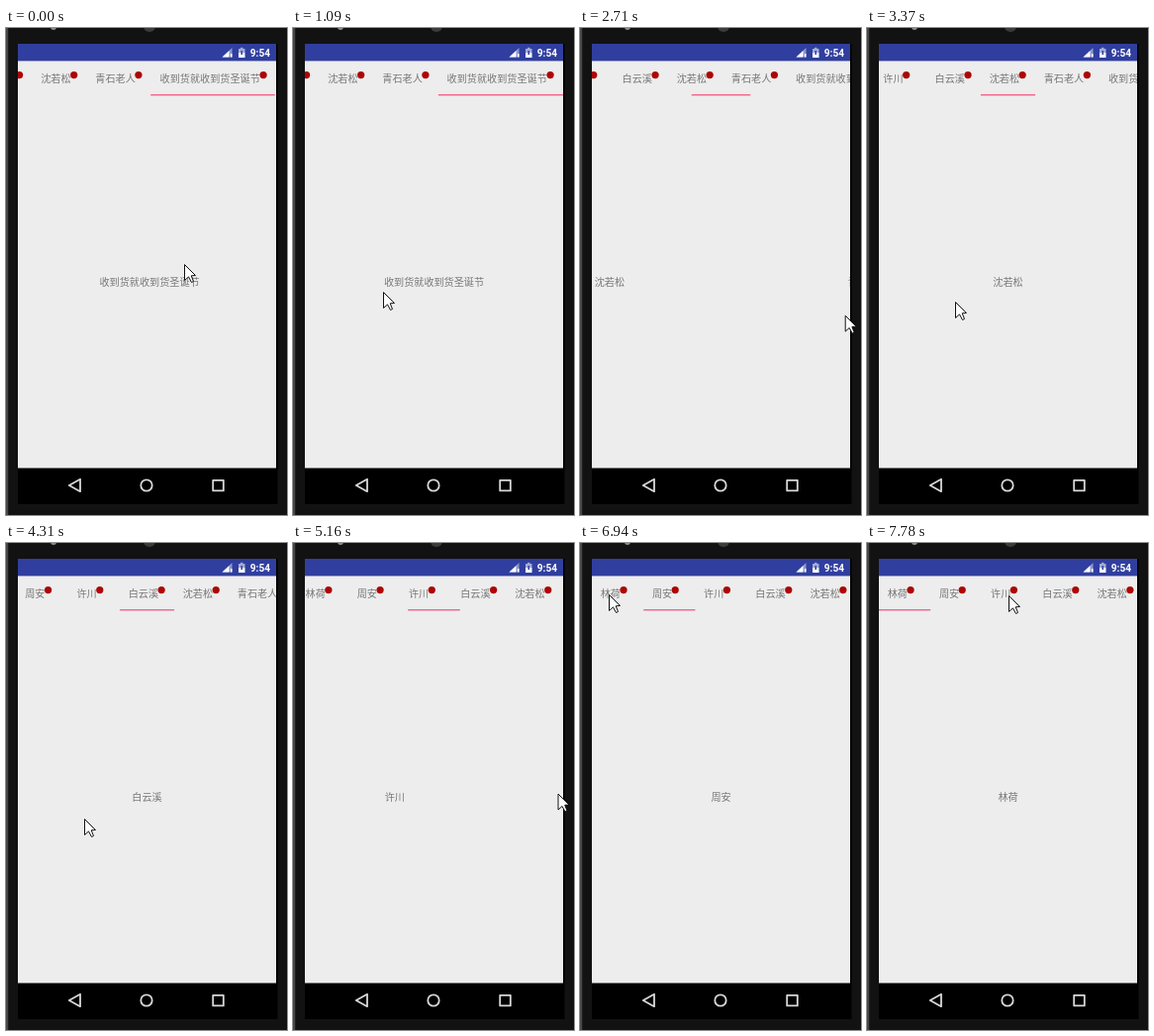
Write an HTML page with a canvas that moves like this. It is 284 px wide and 493 px high and loops after 8 s.

```html
<!DOCTYPE html>
<html lang="zh-CN">
<head>
<meta charset="utf-8">
<style>
  html, body { margin: 0; width: 100%; height: 100%; overflow: hidden; background: #121212; }
  canvas { display: block; width: 284px; height: 493px; }
</style>
</head>
<body>
<canvas id="stage"></canvas>
<script>
const W = 284, H = 493, LOOP = 8000;
const canvas = document.getElementById('stage');
const ctx = canvas.getContext('2d');
const ratio = window.devicePixelRatio || 1;
canvas.width = W * ratio;
canvas.height = H * ratio;

// Screen area and density (pixels per dp)
const LEFT = 12, TOP = 16, WIDTH = 261, HEIGHT = 429.5, DP = 0.725;
const FONT_SIZE = 14 * DP, PAD = 12 * DP, DOT = 10 * DP;
const CJK = `${FONT_SIZE}px "Noto Sans CJK SC", "Noto Sans CJK", sans-serif`;

const titles = ['林荷', '周安', '许川', '白云溪', '沈若松', '青石老人', '收到货就收到货圣诞节'];
let total = 0;
const tabs = titles.map(title => {
  const left = total;
  total += Math.max(72 * DP, title.length * FONT_SIZE + DOT + 2 * PAD);
  return { title, left, right: total };
});

// Pointer moves: each eases to a resting point, swinging sideways by `reach` on the way
const moves = [
  { start: 140, end: 1090, x: 91, y: 267, reach: 0 },
  { start: 1220, end: 2080, x: 101, y: 300, reach: 130 },
  { start: 2200, end: 3370, x: 89, y: 277, reach: 175 },
  { start: 3620, end: 4310, x: 79, y: 279, reach: 130 },
  { start: 4570, end: 5550, x: 150, y: 240, reach: 150 },
  { start: 5670, end: 6240, x: 63, y: 58, reach: 0 },
  { start: 6360, end: 6940, x: 29, y: 52, reach: -45 },
  { start: 7340, end: 7780, x: 143, y: 53, reach: 0 }
];
const swipes = moves.filter(move => move.reach > 0);
const taps = [6040, 7240];

const mix = (a, b, k) => a + (b - a) * k;
const progress = (t, start, end) => Math.max(0, Math.min(1, (t - start) / (end - start)));
const smooth = k => k * k * (3 - 2 * k);

function pageAt(t) {
  let page = titles.length - 1 - 0.01 * (1 - progress(t, 150, 250));
  for (const { start, end } of swipes) page -= smooth(progress(t, start, mix(start, end, 0.8)));
  for (const tap of taps) page -= 1 - (1 - progress(t, tap, tap + 200)) ** 5;
  return Math.max(0, page);
}

function cursorAt(t) {
  let x = 180, y = 239;
  for (const move of moves) {
    const k = progress(t, move.start, move.end);
    x = mix(x, move.x, smooth(k)) + move.reach * Math.sin(Math.PI * k);
    y = mix(y, move.y, smooth(k));
  }
  return [x, y];
}

function rect(color, x, y, w, h) {
  ctx.fillStyle = color;
  ctx.fillRect(x, y, w, h);
}

function shape(points, fill, stroke, lineWidth) {
  ctx.beginPath();
  points.forEach(([x, y]) => ctx.lineTo(x, y));
  ctx.closePath();
  if (fill) { ctx.fillStyle = fill; ctx.fill(); }
  if (stroke) { ctx.strokeStyle = stroke; ctx.lineWidth = lineWidth; ctx.stroke(); }
}

function disc(color, x, y, r) {
  ctx.fillStyle = color;
  ctx.beginPath();
  ctx.arc(x, y, r, 0, 7);
  ctx.fill();
}

function text(label, x, y, color, font, align) {
  ctx.font = font;
  ctx.fillStyle = color;
  ctx.textAlign = align;
  ctx.fillText(label, x, y);
}

function drawDevice() {
  rect('#121212', 0, 0, W, H);
  rect('#484848', 0, 0, 2, H);
  rect('#1e1e1e', 2, 0, 1, H);
  disc('#8c8c8c', 48, -1, 3);
  disc('#3c3c3c', 145, -2, 6);
  rect('#000', LEFT, TOP, 262.5, 466);
  rect('#ededed', LEFT, TOP, WIDTH, HEIGHT);
}

function drawBars() {
  rect('#303f9f', LEFT, TOP, WIDTH, 17.4);
  shape([[218.5, 29.5], [228.5, 29.5], [228.5, 20]], '#8f98cc');
  shape([[218.5, 29.5], [225.5, 29.5], [225.5, 23]], '#fff');
  rect('#fff', 227, 26, 1.5, 3.5);
  rect('#a3abd6', 237, 19.8, 2.5, 1.5);
  rect('#a3abd6', 235, 21, 6.5, 4);
  rect('#fff', 235, 25, 6.5, 5);
  rect('#303f9f', 237.5, 23, 1.5, 4);
  text('9:54', 267, 28.7, '#fff', 'bold 10.1px Roboto, sans-serif', 'right');

  ctx.lineJoin = 'round';
  shape([[63.8, 463], [75, 456.8], [75, 469.2]], null, '#d8d8d8', 1.8);
  ctx.beginPath();
  ctx.arc(142, 463, 5.7, 0, 7);
  ctx.stroke();
  ctx.strokeRect(209.2, 457.8, 10.6, 10.6);
}

function drawPager(page) {
  const from = Math.floor(page), part = page - from;
  const a = tabs[from], b = tabs[Math.min(from + 1, tabs.length - 1)];
  const start = mix(a.left, b.left, part), end = mix(a.right, b.right, part);
  const scroll = Math.max(0, Math.min(total - WIDTH, (start + end - WIDTH) / 2));
  const origin = LEFT - scroll;

  ctx.save();
  ctx.beginPath();
  ctx.rect(LEFT, TOP, WIDTH, HEIGHT);
  ctx.clip();
  tabs.forEach(({ title, left }, i) => {
    const x = origin + left + PAD;
    text(title, x, 54.9, '#777', CJK, 'left');
    disc('#ad0505', x + title.length * FONT_SIZE + DOT / 2 - 0.6, 47.6, DOT / 2);
    text(title, LEFT + WIDTH / 2 + (i - page) * WIDTH, 261.3, '#777', CJK, 'center');
  });
  rect('#f4698f', origin + start, 67, end - start, 1.5);
  ctx.restore();
}

function drawCursor(x, y) {
  const arrow = [[0, 0], [0, 16], [4, 12.4], [7, 18], [9, 17], [6.7, 11.3], [11, 11]];
  shape(arrow.map(([dx, dy]) => [x + dx + 0.5, y + dy + 0.5]), '#fff', '#111', 1);
}

function frame(now) {
  const t = now % LOOP;
  ctx.setTransform(ratio, 0, 0, ratio, 0, 0);
  drawDevice();
  drawPager(pageAt(t));
  drawBars();
  drawCursor(...cursorAt(t));
  requestAnimationFrame(frame);
}
requestAnimationFrame(frame);
</script>
</body>
</html>
```
